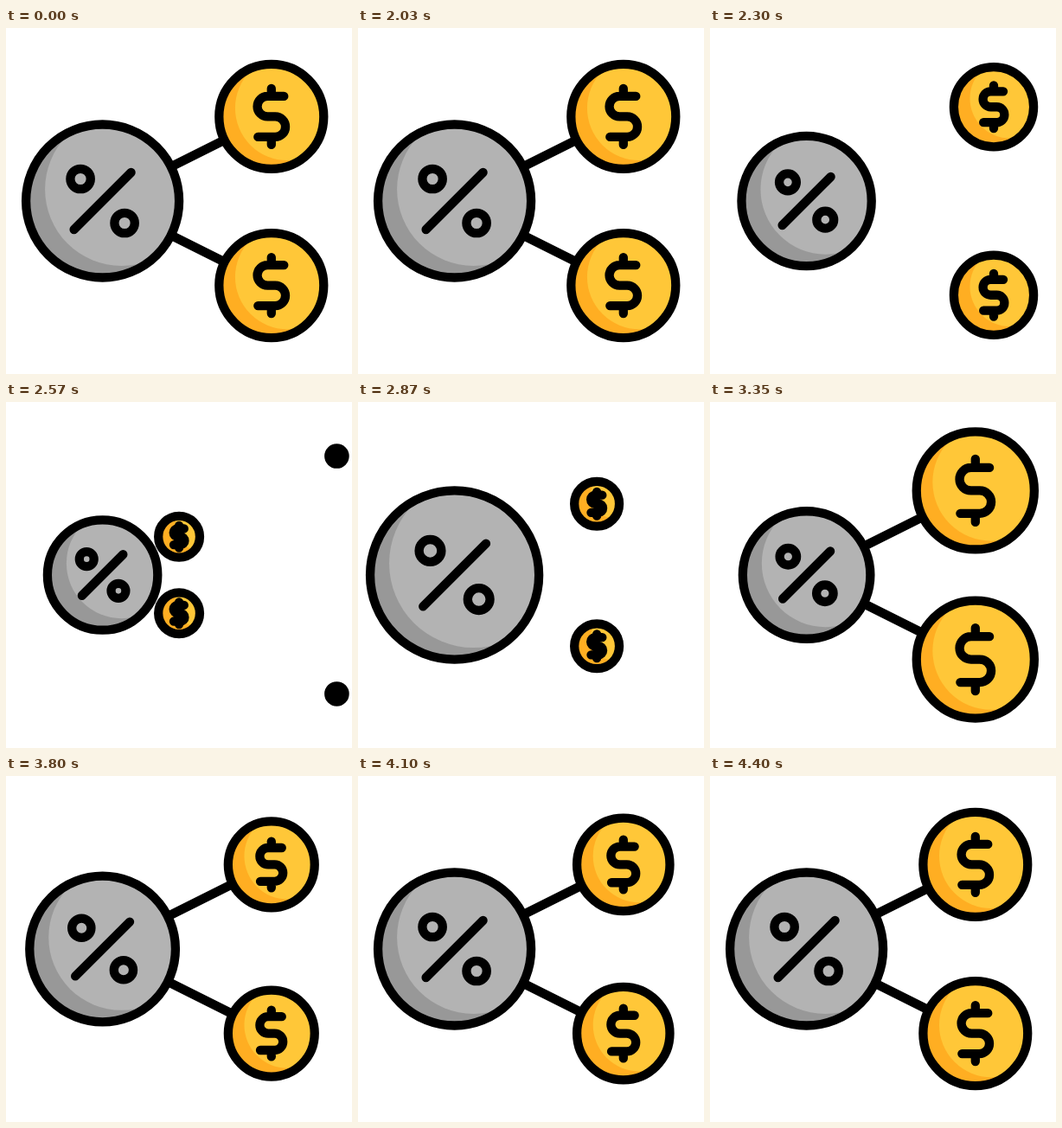
An HTML page without scripts for the animation above (4430 ms loop, 400 by 400 pixels).

```html
<!DOCTYPE html>
<html lang="en">
<head>
<meta charset="utf-8">
<title>Percent share</title>
<style>
  @property --size { syntax: "<number>"; inherits: true; initial-value: 1; }

  html, body { margin: 0; width: 100%; height: 100%; overflow: hidden; background: #fff; }
  svg { display: block; width: 100vw; height: 100vh; }

  .ink {
    fill: none; stroke: #000; stroke-width: 10.3;
    stroke-linecap: round; stroke-linejoin: round;
    vector-effect: non-scaling-stroke;
  }

  /* Highlights keep a fixed offset while their disc changes size. */
  .light { translate: calc(var(--dx) / var(--size)) calc(var(--dy) / var(--size)); }

  .up { --side: -1; }
  .down { --side: 1; }

  .hub, .link, .leaving, .arriving { animation: 4430ms cubic-bezier(.37, 0, .63, 1) infinite; }
  .hub, .leaving, .arriving { scale: var(--size); }
  .hub { --dx: 22px; --dy: -13.5px; animation-name: bounce; }
  .leaving, .arriving { --dx: 18.6px; --dy: -9.8px; }
  .leaving { animation-name: leave; }
  .arriving { animation-name: travel, pop; }
  .link { stroke: #000; stroke-width: 10.5; stroke-dasharray: 1 2; animation-name: trim; }

  @keyframes bounce {
    0%, 45.82% { --size: 1; }
    57.56% { --size: .717; }
    66.59% { --size: 1.141; }
    76.07% { --size: .832; }
    91.2%, 100% { --size: 1; }
  }

  /* The link empties toward the coin, then grows back out of the hub. */
  @keyframes trim {
    0%, 45.82% { stroke-dashoffset: 0; }
    52.5% { stroke-dashoffset: -1; animation-timing-function: step-end; }
    65% { stroke-dashoffset: 1; }
    71.4%, 100% { stroke-dashoffset: 0; }
  }

  @keyframes leave {
    0%, 45.82% {
      translate: 195.2px calc(var(--side) * 97.6px);
      --size: 1; visibility: visible;
      animation-timing-function: cubic-bezier(.4, 0, .75, .6);
    }
    59.3%, 100% {
      translate: 284.2px calc(var(--side) * 144.5px);
      --size: .001; visibility: hidden;
    }
  }

  @keyframes travel {
    0% { translate: 0 0; visibility: hidden; animation-timing-function: step-end; }
    46.16% { translate: 0 0; visibility: visible; }
    71.4%, 100% { translate: 195.2px calc(var(--side) * 97.6px); visibility: visible; }
  }

  @keyframes pop {
    0%, 62.82% { --size: .395; }
    77.31% { --size: 1.149; }
    86.91% { --size: .815; }
    100% { --size: 1; }
  }
</style>
</head>
<body>
<svg viewBox="0 0 400 400">
  <defs>
    <clipPath id="hub-clip"><circle r="88.5"/></clipPath>
    <clipPath id="coin-clip"><circle r="60.5"/></clipPath>
    <g id="coin">
      <circle r="60.5" fill="#ffae22"/>
      <g clip-path="url(#coin-clip)"><circle class="light" r="60.5" fill="#ffc738"/></g>
      <circle class="ink" r="60.5"/>
      <path class="ink" d="M14.5-23.5H-4.5a11.75 11.75 0 0 0 0 23.5H4.5a11.75 11.75 0 0 1 0 23.5H-15.5M0-32.5v9M0 23.5v9"/>
    </g>
  </defs>

  <g transform="translate(111.6 200)">
    <path class="link" pathLength="1" d="M58-29L193-96.5"/>
    <path class="link" pathLength="1" d="M58 29L193 96.5"/>

    <g class="leaving up"><use href="#coin"/></g>
    <g class="leaving down"><use href="#coin"/></g>
    <g class="arriving up"><use href="#coin"/></g>
    <g class="arriving down"><use href="#coin"/></g>

    <g class="hub">
      <circle r="88.5" fill="#989898"/>
      <g clip-path="url(#hub-clip)"><circle class="light" r="88.5" fill="#b3b3b3"/></g>
      <circle class="ink" r="88.5"/>
      <circle class="ink" cx="-25.5" cy="-25.5" r="11.7"/>
      <circle class="ink" cx="25.5" cy="25.5" r="11.7"/>
      <path class="ink" d="M-33 33L33-33"/>
    </g>
  </g>
</svg>
</body>
</html>
```
